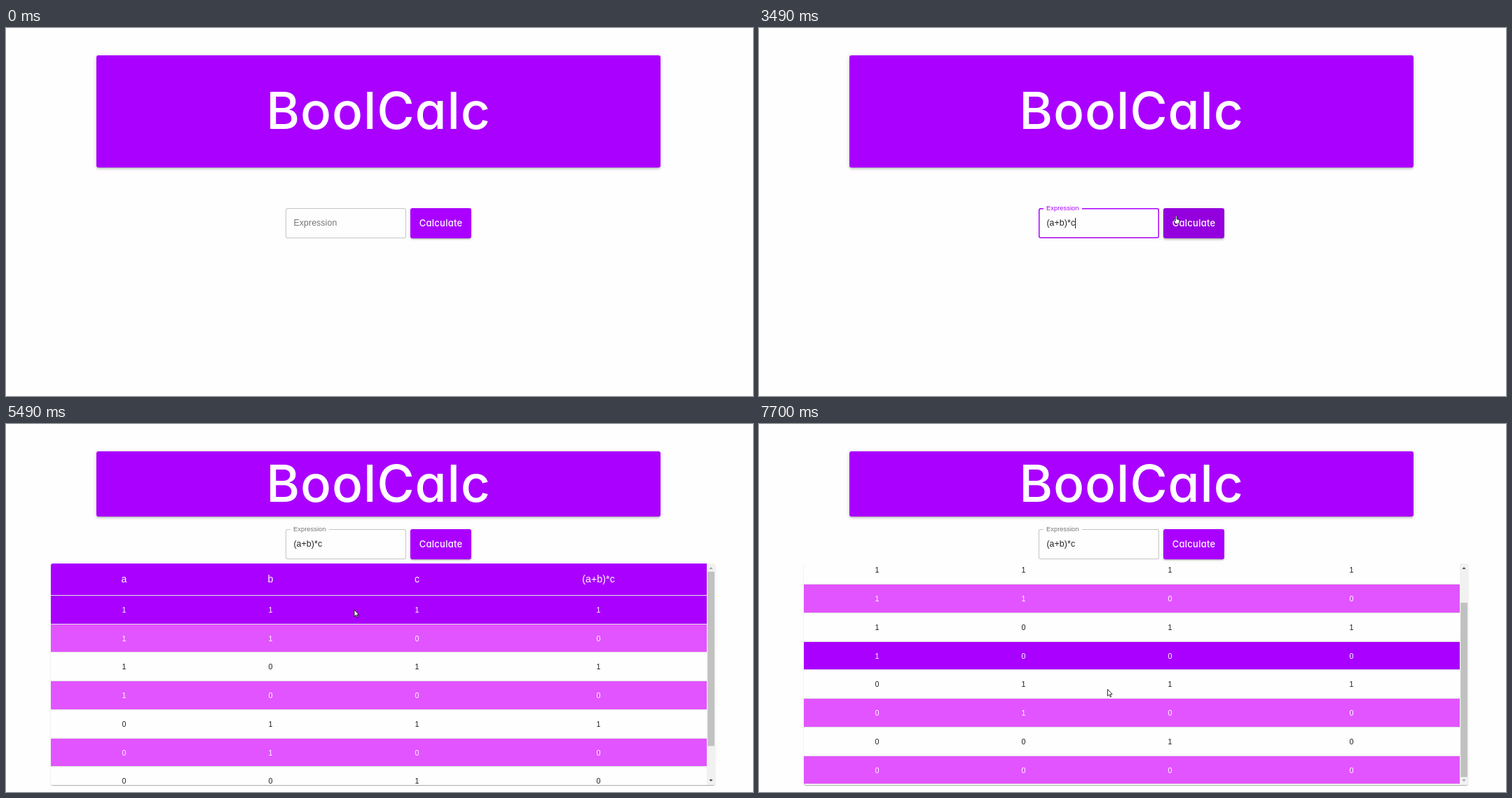
Recreate the animation shown at these times as an HTML page. Size 1066x525 px, loop 8000 ms.

```html
<!DOCTYPE html>
<html lang="en">
<head>
<meta charset="utf-8">
<title>BoolCalc</title>
<style>
html, body { margin: 0; width: 100%; height: 100%; overflow: hidden; background: #fefefe; }
body { position: relative; font: 12.3px "Liberation Sans", Arial, sans-serif; letter-spacing: .115px; }
body div, body svg { position: absolute; }
#banner, #button {
  background: #a0f; color: #fff; border-radius: 3px; text-align: center;
  font-family: Inter, sans-serif; font-weight: 500; font-optical-sizing: none;
  font-feature-settings: "cv11"; white-space: nowrap;
}
#banner {
  left: 129px; top: 39px; width: 805px; font-size: 73px; letter-spacing: .012em;
  box-shadow: 0 2px 2px -1.5px #0003, 0 2px 3px #00000024, 0 1px 6px #0000001f;
}
#title { left: 0; width: 100%; height: 80px; line-height: 80px; }
#field { left: 399.4px; width: 172px; height: 43.2px; border-radius: 3px; line-height: 43.2px; }
#notch { left: 7px; top: -1px; width: 55px; height: 4px; background: #fefefe; }
#label, #value { left: 11px; top: 0; white-space: nowrap; }
#label { transform-origin: 0 50%; }
#value { color: #222; }
#caret { top: 14px; width: 1px; height: 15px; background: #222; }
#button {
  left: 577.3px; width: 86.5px; height: 43.2px; line-height: 43.2px;
  font-size: 13px; letter-spacing: .02em; overflow: hidden;
}
#ripple { border-radius: 50%; background: #fff; transform: translate(-50%, -50%); left: 19.2px; top: 9.7px; }
#menu {
  left: 400px; top: 301px; width: 171px; height: 162.6px; border-radius: 2px;
  background: #292a2d; color: #fff; box-shadow: 0 1px 3px #0006;
  font: 600 9px "Open Sans", "Noto Sans", sans-serif; letter-spacing: 0;
}
#menu div { left: 8.5px; line-height: 25.15px; white-space: nowrap; }
#table {
  left: 64px; width: 948px; overflow: hidden; border-radius: 3px; background: #fefefe;
  box-shadow: 0 1.5px 1px -1px #0003, 0 1px 1px #00000024, 0 1px 2px #0000001f;
}
#rows { left: 0; }
.row {
  left: 0; width: 100%; height: 40.75px; box-sizing: border-box; border-bottom: 1px solid #e0e0e0;
  font-size: 10.75px; line-height: 40px; text-align: center;
}
.row.head { height: 46px; line-height: 45px; font-size: 14.1px; }
.row div { top: 0; }
#bar { right: 0; top: 0; }
#glow { width: 17px; height: 17px; margin: -8.5px; border-radius: 50%; background: rgba(255, 235, 0, .55); }
#pointer { overflow: visible; width: 1px; height: 1px; left: 0; top: 0; }
</style>
</head>
<body>
<div id="banner"><div id="title">BoolCalc</div></div>
<div id="field">
  <div id="notch"></div>
  <div id="label">Expression</div>
  <div id="value">(a+b)*c</div>
  <div id="caret"></div>
</div>
<div id="table">
  <div id="rows"></div>
  <svg id="bar" width="12" height="316">
    <rect width="12" height="316" fill="#f1f1f1"/>
    <rect id="thumb" x="1.2" width="9.8" height="248.7" fill="#c1c1c1"/>
    <path id="up" d="M3.4 8l2.6-3 2.6 3z"/>
    <path id="down" d="M3.4 308l2.6 3 2.6-3z"/>
  </svg>
</div>
<div id="button"><div id="ripple"></div>Calculate</div>
<div id="menu"></div>
<div id="glow"></div>
<svg id="pointer">
  <path id="arrow" d="M0 0v9.6l2.2-2 1.5 3.4 1.5-.6-1.5-3.3h2.9z" fill="#fff" stroke="#000" stroke-width=".8"/>
  <path id="beam" d="M-2.5-5h2l.5.5.5-.5h2M0-4.5v9M-2.5 5h2l.5-.5.5.5h2" fill="none" stroke="#333"/>
  <path id="hand" transform="translate(-3.5)" d="M3 1q0-1 1-1t1 1v4l3 .7q1 .3 1 1.3l-.7 3q-.3 2-2 2h-2q-1 0-1.6-.9L.5 7.5q-.5-1 .4-1.2.8 0 2.1 1.5z" fill="#fff" stroke="#000" stroke-width=".8"/>
</svg>
<script>
const $ = id => document.getElementById(id);
const clamp = v => Math.max(0, Math.min(1, v));
const ramp = (t, start, length) => clamp((t - start) / length);
const smooth = v => v * v * (3 - 2 * v);
const mix = (a, b, p) => a + (b - a) * p;
const blend = (a, b, p) => `rgb(${a.map((v, i) => Math.round(mix(v, b[i], p)))})`;
const show = (id, on) => $(id).style.visibility = on ? 'visible' : 'hidden';
const place = (id, css) => {
  for (const key in css) $(id).style[key] = typeof css[key] === 'number' ? css[key] + 'px' : css[key];
};
const add = (parent, text = '', name = '') => {
  const el = document.createElement('div');
  el.textContent = text;
  el.className = name;
  return parent.appendChild(el);
};

// Bursts of screen updates: first time, last time, count
const ticks = [0];
for (const [a, b, n] of [[190, 320, 3], [740, 890, 3], [1270, 1430, 3], [1720, 1960, 4],
  [2280, 2530, 4], [2810, 2810, 1], [3110, 3580, 7], [3920, 3920, 1], [4150, 4380, 4],
  [4470, 4790, 5], [5170, 5490, 5], [5900, 6050, 3], [6220, 6440, 4], [6620, 6930, 5],
  [7230, 7400, 3], [7700, 7700, 1]])
  for (let i = 0; i < n; i++) ticks.push(Math.floor((a + (n > 1 ? (b - a) * i / (n - 1) : 0)) / 10) * 10);

// Pointer path: time, x, y
const path = [[190, 962, 515], [320, 767, 404], [660, 767, 404], [890, 508.5, 258],
  [1190, 508.5, 258], [1430, 500.5, 271], [3030, 500.5, 271], [3350, 594, 268],
  [3580, 596.5, 267], [5090, 596.5, 267], [5490, 497, 265], [5820, 497, 265],
  [6050, 498, 308], [6150, 498, 308], [6360, 499, 347], [6540, 499, 347],
  [6930, 497, 356], [7150, 497, 356], [7400, 497.5, 378.5]];

function pointerAt(t) {
  const i = path.findIndex(k => k[0] > t);
  if (i < 0) return path[path.length - 1].slice(1);
  if (!i) return path[0].slice(1);
  const [a, b] = [path[i - 1], path[i]];
  const p = ramp(t, a[0], b[0] - a[0]);
  return [mix(a[1], b[1], p), mix(a[2], b[2], p)];
}

['a', 'a+b', 'ab', '[object Object]', 'a+c', 'absbs'].forEach((text, i) => {
  add($('menu'), text).style.top = 6 + i * 25.15 + 'px';
});

function addRow(cells, y, name) {
  const row = add($('rows'), '', 'row ' + name);
  row.style.top = y + 'px';
  cells.forEach((text, i) => {
    const cell = add(row, text);
    cell.style.left = i * 22.33 + '%';
    cell.style.width = (i < 3 ? 22.33 : 33.01) + '%';
  });
  return row;
}
const head = addRow(['a', 'b', 'c', '(a+b)*c'], 0, 'head');
head.style.background = '#a0f';
head.style.color = '#fff';
const rows = [];
for (let i = 0; i < 8; i++) {
  const n = 7 - i, a = n >> 2, b = n >> 1 & 1, c = n & 1;
  rows.push(addRow([a, b, c, (a | b) & c], 46 + i * 40.75, ''));
}

const gray = [117, 117, 117], purple = [170, 0, 255];

function draw(time) {
  const t = ticks.filter(k => k <= time).pop();
  const stage = t < 4380 ? 0 : t < 4470 ? 1 : 2;
  const height = [160, 146, 93.3][stage];
  const top = [257.3, 234.5, 149.6][stage];
  const [x, y] = pointerAt(t);
  const inside = y > top && y < top + 43.2;
  const kind = inside && x > 399 && x < 572 ? 'beam' : inside && x > 577 && x < 664 ? 'hand' : 'arrow';

  place('banner', { height });
  place('title', { top: height / 2 - 40.8 });

  const focused = t >= 1720 && t < 4150;
  const raised = smooth(ramp(t, 1625, 200));
  place('field', {
    top,
    boxShadow: 'inset 0 0 0 ' + (focused ? '1.5px #a0f' : '1px ' + (kind === 'beam' ? '#212121' : '#c4c4c4'))
  });
  show('notch', raised > .9);
  place('label', {
    color: focused ? blend(gray, purple, raised) : blend(gray, gray, 0),
    transform: `translateY(${-21.6 * raised}px) scale(${1 - .25 * raised})`
  });
  show('value', t >= 2280);
  show('caret', focused && (t < 2810 || t >= 3340 && t < 3920));
  place('caret', { left: t < 2280 ? 11 : 52 });

  const closing = ramp(t, 2330, 165);
  show('menu', t >= 1720 && closing < 1);
  place('menu', { opacity: String(1 - closing), transform: `scale(${1 - .05 * closing})` });

  const hover = ramp(t, 3310, 250) - ramp(t, 4440, 250);
  place('button', {
    top,
    background: blend(purple, [118, 0, 178], hover),
    boxShadow: `0 ${mix(2, 1.5, hover)}px ${mix(1, 3, hover)}px ${mix(-1.5, -.8, hover)}px #0003,
      0 ${mix(1.5, 3, hover)}px ${mix(1.5, 4, hover)}px #00000024, 0 1px ${mix(4, 8, hover)}px #0000001f`
  });
  const spread = 1 - (1 - ramp(t, 4130, 550)) ** 2;
  place('ripple', {
    width: 152 * spread, height: 152 * spread,
    opacity: String((.1 + .2 * spread) * (1 - ramp(t, 4420, 370)))
  });

  const full = stage === 2, scrolled = t >= 7700;
  $('table').style.display = stage ? '' : 'none';
  $('bar').style.display = full ? '' : 'none';
  place('table', { top: top + 49.3, height: full ? 316 : 46 });
  place('rows', { width: full ? 936 : 948, top: scrolled ? -56.5 : 0 });
  const active = t >= 4550 ? Math.floor((y - 245) / 40.75) : -1;
  rows.forEach((row, i) => {
    row.style.display = full ? '' : 'none';
    row.style.background = i === active ? '#a0f' : i % 2 ? '#e254ff' : '#fefefe';
    row.style.color = i === active || i % 2 ? '#fff' : '#222';
  });
  $('thumb').setAttribute('y', scrolled ? 56 : 11.7);
  $('up').setAttribute('fill', scrolled ? '#505050' : '#a3a3a3');
  $('down').setAttribute('fill', scrolled ? '#a3a3a3' : '#505050');

  show('glow', t >= 1720 && t < 1880 || t >= 4150 && t < 4240);
  place('glow', { left: x - 1, top: y });
  for (const id of ['arrow', 'beam', 'hand']) show(id, t >= 190 && id === kind);
  place('pointer', { transform: `translate(${x}px, ${y}px)` });
}

const start = performance.now();
function loop() {
  draw((performance.now() - start) % 8000);
  requestAnimationFrame(loop);
}
loop();
</script>
</body>
</html>
```
